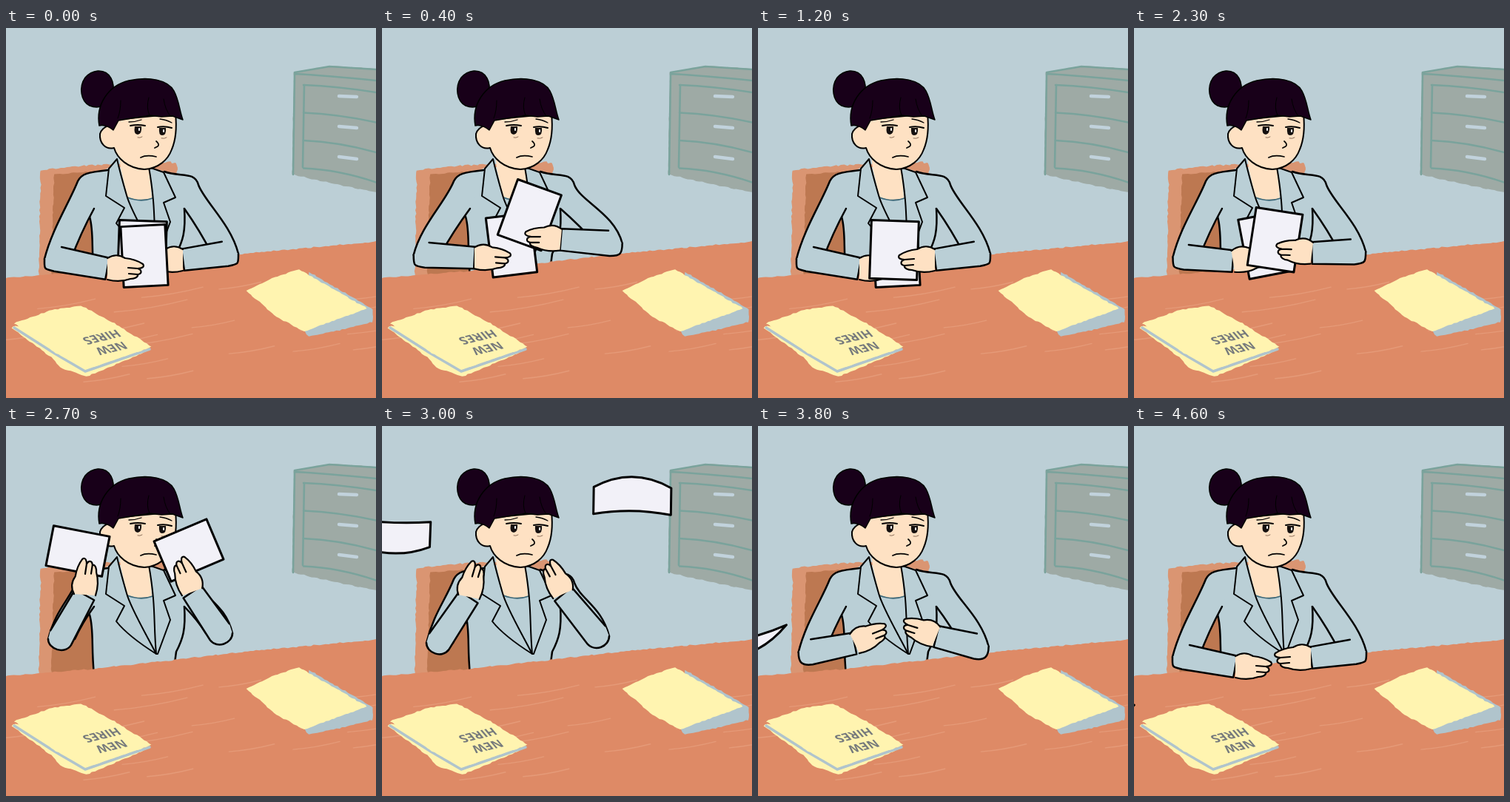
These frames come from a looping animation (500x500 px, 4800 ms). An HTML page with a canvas:

```html
<!DOCTYPE html>
<html lang="en">
<head>
<meta charset="utf-8">
<title>Paper toss</title>
<style>
html, body { margin: 0; width: 100%; height: 100%; overflow: hidden; background: #bccfd6; }
canvas { display: block; width: 500px; height: 500px; }
</style>
</head>
<body>
<canvas id="stage" width="500" height="500"></canvas>
<script>
const LOOP = 4800, STEP = 100;
const ctx = document.getElementById('stage').getContext('2d');
const C = {
  wall: '#bccfd6', jacket: '#bacfd6', ink: '#000', skin: '#fee1c3', hair: '#180019', paper: '#f2f1f8',
  table: '#de8a66', grain: '#e59a78', chair: '#da9572', seat: '#bd7851',
  cabinet: '#9eaaa5', trim: '#7aa39c', handle: '#c1d2dc', folder: '#fff4b0', edge: '#b0c4cc', label: '#75797c'
};

// arm: elbow x y, wrist x y, hand angle
// paper: centre x y, angle, length, width, bow of upper and lower edge
const left = {
  side: 1, shoulder: 'M138 192C110 195 102 197 97 207C86 235 ', armpit: [119, 244],
  rest: { arm: [68, 312, 137, 325, 0], paper: [187, 308, 87, 82, 60, 0, 0] },
  apart: { arm: [54, 304, 119, 303, 0], paper: [169, 286, 81, 80, 60, 0, 0] },
  raised: { arm: [73, 288, 106, 228, -86], paper: [97, 169, 11, 77, 55, 0, 0] },
  tossed: { arm: [76, 293, 117, 231, -78], paper: [-10, 229, -12, 138, 0, 14, 54] },
  flight: { arc: 200, driftX: -31, fall: 88, gravity: 0 }
};
const right = {
  side: -1, shoulder: 'M214 194C235 202 255 193 260 212C268 234 ', armpit: [241, 244],
  rest: { arm: [298, 305, 239, 313, 0], paper: [184, 300, -88, 79, 64, 0, 0] },
  apart: { arm: [314, 284, 243, 272, -8], paper: [207, 229, -61, 80, 62, 0, 0] },
  raised: { arm: [290, 280, 252, 224, -70], paper: [247, 168, -23, 77, 59, 0, 0] },
  tossed: { arm: [291, 284, 245, 227, -66], paper: [366, 167, 39, 149, 0, -75, -25] },
  flight: { arc: 280, driftX: 0, fall: 280, gravity: 280 }
};
const HAND = 'M0-14C8-19 16-19 24-14C34-13 42-10 48-6C51-2 46 0 41 0C47 2 47 7 41 8C42 12 36 14 31 14C20 18 8 17 0 15M28-1L41 0M29 7L41 8';

const clamp = v => Math.min(1, Math.max(0, v));
const smooth = v => v * v * (3 - 2 * v);
const mix = (a, b, k) => a.map((v, i) => v + (b[i] - v) * k);
const span = (t, from, length) => clamp((t - from) / length);

const shuffle = t => t < 1200 ? 1 - Math.abs(t % 600 / 300 - 1) : 0;
const lift = t => smooth(span(t, 2200, 500));

function held(who, part, t) {
  return mix(mix(who.rest[part], who.apart[part], shuffle(t)), who.raised[part], lift(t));
}

function armPose(who, t) {
  const toss = mix(held(who, 'arm', t), who.tossed.arm, span(t, 2700, 300));
  return mix(toss, who.rest.arm, span(t, 3400, 600));
}

function paperPose(who, t) {
  if (t <= 2700) return held(who, 'paper', t);
  const { arc, driftX, fall, gravity } = who.flight;
  const u = (t - 2750) / 650, v = Math.min(1, u), w = Math.max(0, u - 1);
  const from = who.raised.paper, to = who.tossed.paper, p = mix(from, to, v);
  p[0] = to[0] + (from[0] - to[0]) * (1 - v) ** 3 + driftX * w;
  p[1] += fall * w + gravity * w * w - arc * v * (1 - v);
  return p;
}

let seed = 7;
const random = () => (seed = seed * 16807 % 2147483647) / 2147483647;

// Polygon with a crayon-like edge
function rough(points, amount = 1.4) {
  const path = new Path2D();
  points.forEach(([x, y], i) => {
    const [x2, y2] = points[(i + 1) % points.length];
    const n = Math.ceil(Math.hypot(x2 - x, y2 - y) / 4);
    for (let k = 0; k < n; k++) {
      const [px, py] = mix([x, y], [x2, y2], k / n);
      path.lineTo(px + (random() - .5) * amount, py + (random() - .5) * amount);
    }
  });
  return path;
}

function grainLines() {
  let d = '';
  for (let i = 0; i < 22; i++) {
    const x = random() * 480, y = 350 - x * .08 + random() * 145, len = 40 + random() * 60;
    d += `M${x} ${y}q${len / 2} ${-len * .04} ${len} ${-len * .17}`;
  }
  return d;
}

const scenery = {
  cabinet: rough([[389, 60], [437, 51], [510, 56], [510, 224], [440, 210], [387, 198]]),
  chair: rough([[47, 192], [105, 186], [222, 181], [231, 184], [231, 240], [119, 250], [119, 340], [44, 340]], 2),
  seat: rough([[65, 198], [115, 194], [119, 340], [61, 340]]),
  table: rough([[-5, 338], [110, 329], [220, 317], [330, 304], [420, 296], [505, 288], [505, 505], [-5, 505]], 1.6),
  grain: grainLines(),
  folderBack: rough([[7, 405], [13, 402], [190, 437], [109, 471], [73, 459], [64, 447]]),
  folderTop: rough([[11, 399], [62, 381], [101, 375], [150, 401], [197, 431], [108, 461], [68, 440]]),
  stack: rough([[400, 405], [410, 330], [496, 380], [495, 397], [462, 406], [409, 417]]),
  stackTop: rough([[325, 355], [360, 338], [396, 326], [488, 379], [403, 410], [365, 390]])
};

function shape(d, fill, stroke, width = 2.5) {
  const p = new Path2D(d);
  if (fill) { ctx.fillStyle = fill; ctx.fill(p); }
  if (stroke) { ctx.strokeStyle = stroke; ctx.lineWidth = width; ctx.stroke(p); }
}

function at(x, y, deg, flip, paint) {
  ctx.save();
  ctx.translate(x, y);
  ctx.scale(flip, 1);
  ctx.rotate(deg * Math.PI / 180);
  paint();
  ctx.restore();
}

function sheet([x, y, deg, len, wide, up, low]) {
  const a = len / 2, b = wide / 2;
  at(x, y, deg, 1, () => shape(
    `M${-a} ${-b}Q0 ${up - b} ${a} ${-b}L${a} ${b}Q0 ${low + b} ${-a} ${b}Z`, C.paper, C.ink, 3));
}

function sleeve({ side, shoulder, armpit }, [ex, ey, wx, wy]) {
  const len = Math.hypot(wx - ex, wy - ey), dx = (wx - ex) / len, dy = (wy - ey) / len;
  const pt = (x, y, along, out) =>
    `${x + dx * along + side * dy * out} ${y + dy * along - side * dx * out} `;
  const outer = ex - 16 * side, inner = ex + 20 * side;
  shape(`${shoulder}${ex - 6 * side} ${ey - 40} ${outer} ${ey}L${inner} ${ey}` +
    `Q${(inner + armpit[0]) / 2 - 3 * side} ${(ey + armpit[1]) / 2} ${armpit.join(' ')}`, C.jacket, C.ink);
  shape(`M${pt(ex, ey, 4, 17)}L${pt(wx, wy, 0, 14.5)}L${pt(wx, wy, 0, -15)}L${pt(ex, ey, 0, -17)}` +
    `C${pt(ex, ey, -15, -16)}${outer} ${ey + 14} ${outer} ${ey}`, C.jacket, C.ink);
}

function armGroup(who, t, paper) {
  const arm = armPose(who, t);
  sleeve(who, arm);
  if (paper) sheet(paper);
  at(arm[2], arm[3], arm[4], who.side, () => shape(HAND, C.skin, C.ink, 2.2));
}

function room() {
  ctx.fillStyle = C.wall;
  ctx.fillRect(0, 0, 500, 500);
  shape(scenery.cabinet, C.cabinet);
  shape('M390 62Q430 64 500 71M390 62L388 198M403 77L401 188M390 60L437 52L500 56', null, C.trim, 2.6);
  for (let i = 0; i < 4; i++) {
    const y = 77 + i * 37.5;
    shape(`M402 ${y}Q450 ${y + 2} 500 ${y + 10 + i * 3}`, null, C.trim, 2.6);
    if (i < 3) shape(`M450 ${92 + i * 41}l24 ${1 + i}`, null, C.handle, 4.5);
  }
  shape(scenery.chair, C.chair);
  shape(scenery.seat, C.seat);
}

function body() {
  shape('M140 188L119 200L113 255C118 270 116 300 119 335L225 325L230 312C240 290 243 275 241 244L225 198L196 188Z', C.jacket);
  shape('M113 255C119 275 115 300 119 335M241 244C243 275 239 288 230 305L228 320', null, C.ink);
  shape('M152 160L155 190L164 228Q182 236 197 230L193 182Z', C.skin);
  shape('M164 229Q182 236 198 230', null, '#3d6878', 1.8);
  shape('M150 177L139 190L135 227L160 243L149 264Q165 284 203 308C186 275 168 245 163 226Q154 195 150 177Z', C.jacket, C.ink, 2);
  shape('M193 188L213 195L229 229L213 236L222 262L205 308H203C199 265 203 245 193 188Z', C.jacket, C.ink, 2);
}

function head() {
  shape('M124 58C141 57 148 74 144 90C140 105 125 110 113 105C101 99 98 80 107 67Q114 59 124 58Z', C.hair, C.ink, 1.5);
  shape('M147 124C143 132 130 132 127 143C126 155 134 165 146 162C150 176 165 190 187 191C206 190 219 178 224 164Q232 145 229 116Z', C.skin, C.ink, 2);
  shape('M126 132C121 105 137 78 166 71C193 65 219 70 227 85C234 98 234 110 239 124L225 119L210 120L194 118L170 122L152 125L145 138Q135 130 126 132Z', C.hair, C.ink, 1.5);
  shape('M155 98Q155 112 151 122M193 94Q189 108 194 118M213 96Q215 110 222 119', null, '#000', 1);
  shape('M166 127Q175 127 183 124M208 123Q217 124 224 128', null, C.ink, 1.3);
  shape('M168 132Q178 130 188 132M205 134Q214 132 224 135', null, C.ink, 2);
  shape('M174 133Q172 144 178 144Q184 143 183 133ZM207 135Q206 145 211 145Q217 145 216 135Z', '#15100f');
  shape('M180 136V138M213 138V140', null, '#fff', 2);
  shape('M178 148Q181 149 184 147M210 149Q214 150 217 148', null, '#8d705b', 1);
  shape('M203 153Q208 157 205 160L201 162M182 175Q190 171 203 174', null, C.ink, 1.7);
}

function desk() {
  shape(scenery.table, C.table);
  shape(scenery.grain, null, C.grain, 1.4);
  shape(scenery.folderBack, C.folder);
  shape('M11 405L66 440L107 464L194 434', null, C.edge, 3.5);
  shape(scenery.folderTop, C.folder);
  shape(scenery.stack, C.edge);
  shape(scenery.stackTop, C.folder);
  ctx.save();
  ctx.transform(-.97, .24, -.65, -.76, 135, 424);
  ctx.fillStyle = C.label;
  ctx.font = 'bold 17px "Open Sans", sans-serif';
  ctx.textAlign = 'center';
  ctx.textBaseline = 'middle';
  ctx.fillText('NEW', 0, -10);
  ctx.fillText('HIRES', 0, 10);
  ctx.restore();
}

function draw(t) {
  const thrown = t > 2700, rightPaper = paperPose(right, t);
  room();
  body();
  head();
  if (thrown) sheet(rightPaper);
  desk();
  const groups = [
    () => armGroup(left, t, paperPose(left, t)),
    () => armGroup(right, t, thrown ? null : rightPaper)
  ];
  if (t < 300) groups.reverse();
  groups.forEach(paint => paint());
}

ctx.lineJoin = ctx.lineCap = 'round';
const start = performance.now();
function tick() {
  const t = Math.max(0, performance.now() - start) % LOOP;
  draw(Math.floor(t / STEP) * STEP);
  requestAnimationFrame(tick);
}
tick();
</script>
</body>
</html>
```
